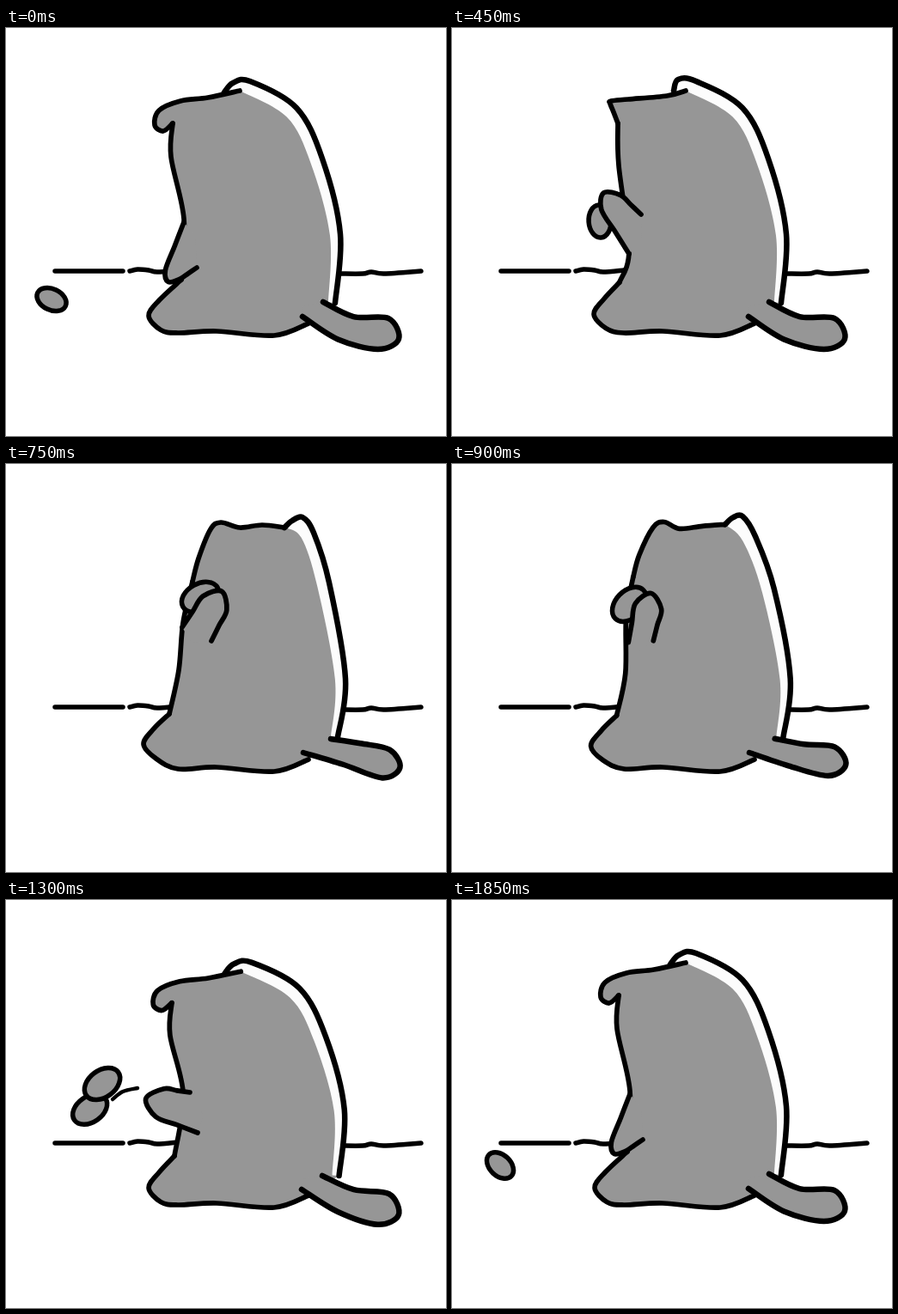
Write an HTML page with a canvas that moves like this. It is 512 by 475 pixels and loops after 1950 ms.

```html
<!DOCTYPE html>
<html lang="en">
<head>
<meta charset="utf-8">
<title>Cat and pebble</title>
<style>
html, body { margin: 0; width: 100%; height: 100%; overflow: hidden; background: #fff; }
canvas { display: block; }
</style>
</head>
<body>
<canvas id="stage" width="512" height="475"></canvas>
<script>
const ctx = document.getElementById('stage').getContext('2d');
const LOOP = 1950, STEP = 50, GREY = '#969696', WHITE = '#fcfcfc';

// head: brow to cheek; side: chest, waist; foot: hip, heel centre; back: crown to seat.
// Limbs: two root points, tip centre, tip radius, bend.
const sit = {
  head: [272,73, 235,81, 203,85, 178,96, 173,113, 183,120, 194,111],
  side: [192,150, 207,222],
  foot: [204,293, 184,334],
  back: [254,75, 264,64, 284,62, 338,93, 368,152, 389,240, 383,320],
  tail: [345,336, 369,319, 439,356, 19, 8],
  arm:  [207,226, 222,279, 194,287, 10, 0]
};
const drop = { ...sit, arm: [209,224, 223,273, 199,290, 12, 0] };
const lift = { ...sit,
  head: [272,73, 250,79, 205,83, 185,85, 184,88, 188,98, 193,111],
  side: [194,160, 206,258],
  foot: [195,296, 183,332],
  back: [258,73, 263,60, ...sit.back.slice(4)],
  arm:  [220,217, 206,263, 185,203, 14, 0]
};
const turn = {
  head: [324,74, 298,71, 272,74, 250,68, 238,76, 224,110, 217,137],
  side: [206,185, 201,240],
  foot: [190,291, 178,325],
  back: [324,74, 333,66, 345,62, 358,80, 376,138, 395,250, 386,318],
  tail: [346,336, 378,320, 442,349, 17, -1],
  arm:  [239,206, 205,190, 243,162, 16, 0]
};
const aim = {
  head: [300,60, 272,76, 244,79, 238,66, 222,68, 200,95, 193,117],
  side: [193,155, 204,255],
  foot: [196,298, 184,334],
  back: [300,60, 309,52, 319,58, 338,95, 371,165, 390,250, 384,318],
  tail: [346,336, 369,319, 440,338, 18, 10],
  arm:  [221,205, 206,258, 187,176, 14, 0]
};
// The throw presses the sitting body down and a little wider.
const squash = p => p.map((v, i) => i % 2 ? 350 + (v - 350) * 0.963 : 230 + (v - 230) * 1.03);
const toss = {
  head: squash(sit.head), side: squash(sit.side), back: squash(sit.back),
  foot: aim.foot,
  tail: [344,337, 368,321, 439,360, 19, 6],
  arm:  [214,224, 223,271, 179,236, 17, 0]
};

const poses = [
  [0, sit], [150, sit], [400, lift], [600, lift], [700, turn], [850, turn],
  [1000, aim], [1150, aim], [1250, toss], [1300, toss], [1450, drop], [1550, drop],
  [1650, sit], [LOOP, sit]
];
// x, y, size, angle
const rest = [53,316, 18, 0.45], low = [172,225, 19, 1.5];
const high = [226,155, 23, 2.64], ready = [167,180, 24, 1.75];
const stones = [
  [0, rest], [150, rest], [150, [200,278, 13, 1.5]], [400, low], [600, low],
  [700, high], [850, high], [1000, ready], [1150, ready],
  [1200, [112,214, 23, 2.5]], [1500, [69,303, 20, 2.6]],
  [1600, [59,311, 18, 3.2]], [1750, [56,309, 18, 3.9]], [LOOP, [56,309, 18, 3.9]]
];

const mix = (a, b, k) => a.map((v, i) => v + (b[i] - v) * k);
const ease = k => k * k * (3 - 2 * k);

function between(keys, t) {
  let i = 0;
  while (i < keys.length - 2 && t >= keys[i + 1][0]) i++;
  const [t0, a] = keys[i], [t1, b] = keys[i + 1];
  return { a, b, k: (t - t0) / (t1 - t0) };
}

function poseAt(t) {
  const { a, b, k } = between(poses, t), pose = {};
  for (const part in a) pose[part] = mix(a[part], b[part], ease(k));
  return pose;
}

// Adds a smooth curve through the points to the current path.
function curve(p, join) {
  const n = p.length / 2;
  const at = i => {
    i = Math.max(0, Math.min(n - 1, i));
    return [p[2 * i], p[2 * i + 1]];
  };
  if (join) ctx.lineTo(p[0], p[1]); else ctx.moveTo(p[0], p[1]);
  for (let i = 0; i < n - 1; i++) {
    const a = at(i - 1), b = at(i), c = at(i + 1), d = at(i + 2);
    ctx.bezierCurveTo(b[0] + (c[0] - a[0]) / 6, b[1] + (c[1] - a[1]) / 6,
      c[0] - (d[0] - b[0]) / 6, c[1] - (d[1] - b[1]) / 6, c[0], c[1]);
  }
}

function flip(p) {
  const out = [];
  for (let i = p.length - 2; i >= 0; i -= 2) out.push(p[i], p[i + 1]);
  return out;
}

function fill(color, ...parts) {
  ctx.beginPath();
  parts.forEach((p, i) => curve(p, i > 0));
  ctx.fillStyle = color;
  ctx.fill();
}

function line(p, width = 5.7) {
  ctx.beginPath();
  curve(p);
  ctx.lineWidth = width;
  ctx.stroke();
}

// A rounded limb; its root is open and blends into the body.
function limb([ax, ay, bx, by, x, y, r, bend], width) {
  const mx = (ax + bx) / 2, my = (ay + by) / 2, len = Math.hypot(x - mx, y - my);
  const dx = (x - mx) / len, dy = (y - my) / len, nx = -dy, ny = dx;
  const x1 = x + nx * r, y1 = y + ny * r, x2 = x - nx * r, y2 = y - ny * r;
  const edge = [
    ax, ay, (ax + x1) / 2 + nx * bend, (ay + y1) / 2 + ny * bend, x1, y1,
    x + dx * r, y + dy * r,
    x2, y2, (bx + x2) / 2 + nx * bend, (by + y2) / 2 + ny * bend, bx, by
  ];
  fill(GREY, edge, [mx - dx * 12, my - dy * 12]);
  line(edge, width);
}

function footLine([hipX, hipY, x, y]) {
  const p = [hipX, hipY];
  for (let i = 0; i < 3; i++) {
    const a = -1.9 - 1.3 * i;
    p.push(x + 18 * Math.cos(a), y + 18 * Math.sin(a));
  }
  return [...p, 200,355, 245,353, 312,358, 352,344];
}

// Inner edge of the light rim: the back moved inwards, narrowing downwards.
function rimLine(back, brow) {
  const p = [...brow], last = back.length - 2;
  for (let i = 6; i <= last; i += 2) {
    const j = Math.min(i + 2, last);
    const tx = back[j] - back[i - 2], ty = back[j + 1] - back[i - 1];
    const w = (16 - 8 * (i / last) ** 4) / Math.hypot(tx, ty);
    p.push(back[i] - ty * w, back[i + 1] + tx * w);
  }
  return p;
}

function stone(t) {
  const { a, b, k } = between(stones, t);
  const [x, y, size, angle] = mix(a, b, k);
  ctx.beginPath();
  ctx.ellipse(x, y, size, size * 0.68, angle, 0, 7);
  ctx.fillStyle = GREY;
  ctx.fill();
  ctx.lineWidth = 5.5;
  ctx.stroke();
}

function table() {
  line([57,283, 136,283], 5.5);
  line([144,283, 153,281, 166,282, 176,284, 200,282], 5.5);
  line([390,286, 415,286, 425,284, 440,286, 483,283], 5.5);
}

function cat(t) {
  const { head, side, foot, back, tail, arm } = poseAt(t);
  const flank = [...head.slice(-2), ...side, ...foot.slice(0, 2)], base = footLine(foot);
  fill(GREY, head, flank, base, flip(back));
  fill(WHITE, back, flip(rimLine(back, head.slice(0, 2))));
  line(back, 6.5);
  [head, flank, base].forEach(p => line(p));
  limb(tail, 6.5);
  if (t >= 150 && t < 1200) stone(t);
  limb(arm);
}

function draw(t) {
  ctx.fillStyle = '#fff';
  ctx.fillRect(0, 0, 512, 475);
  ctx.lineCap = ctx.lineJoin = 'round';
  table();
  cat(t);
  if (t < 150 || t >= 1200) stone(t);
  if (t >= 1300 && t < 1600) stone(t - 100);
  if (t >= 1250 && t < 1400) line([124,232, 136,223, 153,219], 4.5);
}

const start = performance.now();
function tick() {
  const t = (performance.now() - start) % LOOP;
  draw(Math.min(1850, Math.floor(t / STEP) * STEP));
  requestAnimationFrame(tick);
}
tick();
</script>
</body>
</html>
```
